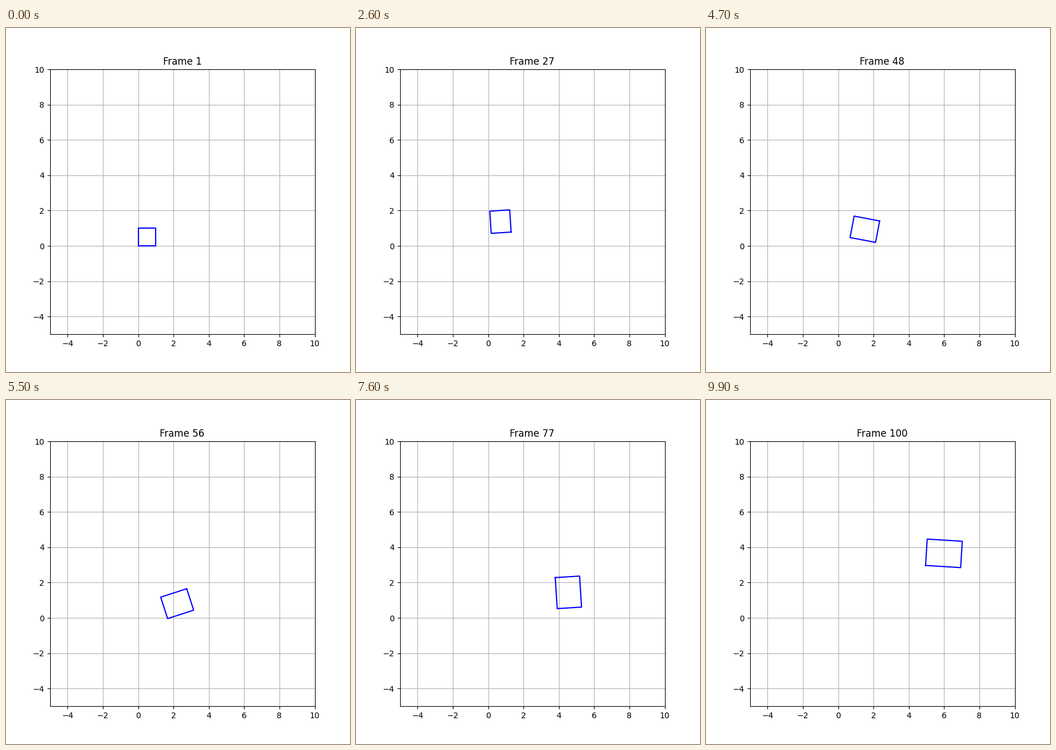
A matplotlib script that plays this animation: 600x600 px, repeating every 10 s.

```python
import numpy as np
import matplotlib.pyplot as plt
from matplotlib.animation import FuncAnimation

FRAMES = 100
SQUARE = np.array([[0, 1, 1, 0, 0],
                   [0, 0, 1, 1, 0]], dtype=float)
SHIFT = np.array([[5.0], [3.0]])   # total translation over one loop
GROWTH = np.array([[1.0], [0.5]])  # total added scale per axis


def transform(t):
    """Scale, rotate about the origin, then translate the square."""
    a = 2 * np.pi * t
    rotation = np.array([[np.cos(a), -np.sin(a)],
                         [np.sin(a), np.cos(a)]])
    return rotation @ (SQUARE * (1 + GROWTH * t)) + SHIFT * t


fig, ax = plt.subplots(figsize=(6, 6), dpi=100)
ax.set_xlim(-5, 10)
ax.set_ylim(-5, 10)
ax.set_aspect("equal")
ax.grid(True)
line, = ax.plot([], [], "b-")
title = ax.set_title("")


def update(i):
    line.set_data(*transform(i / FRAMES))
    title.set_text(f"Frame {i + 1}")
    return line, title


anim = FuncAnimation(fig, update, frames=FRAMES, interval=100, repeat=True,
                     repeat_delay=0)
plt.show()
```
